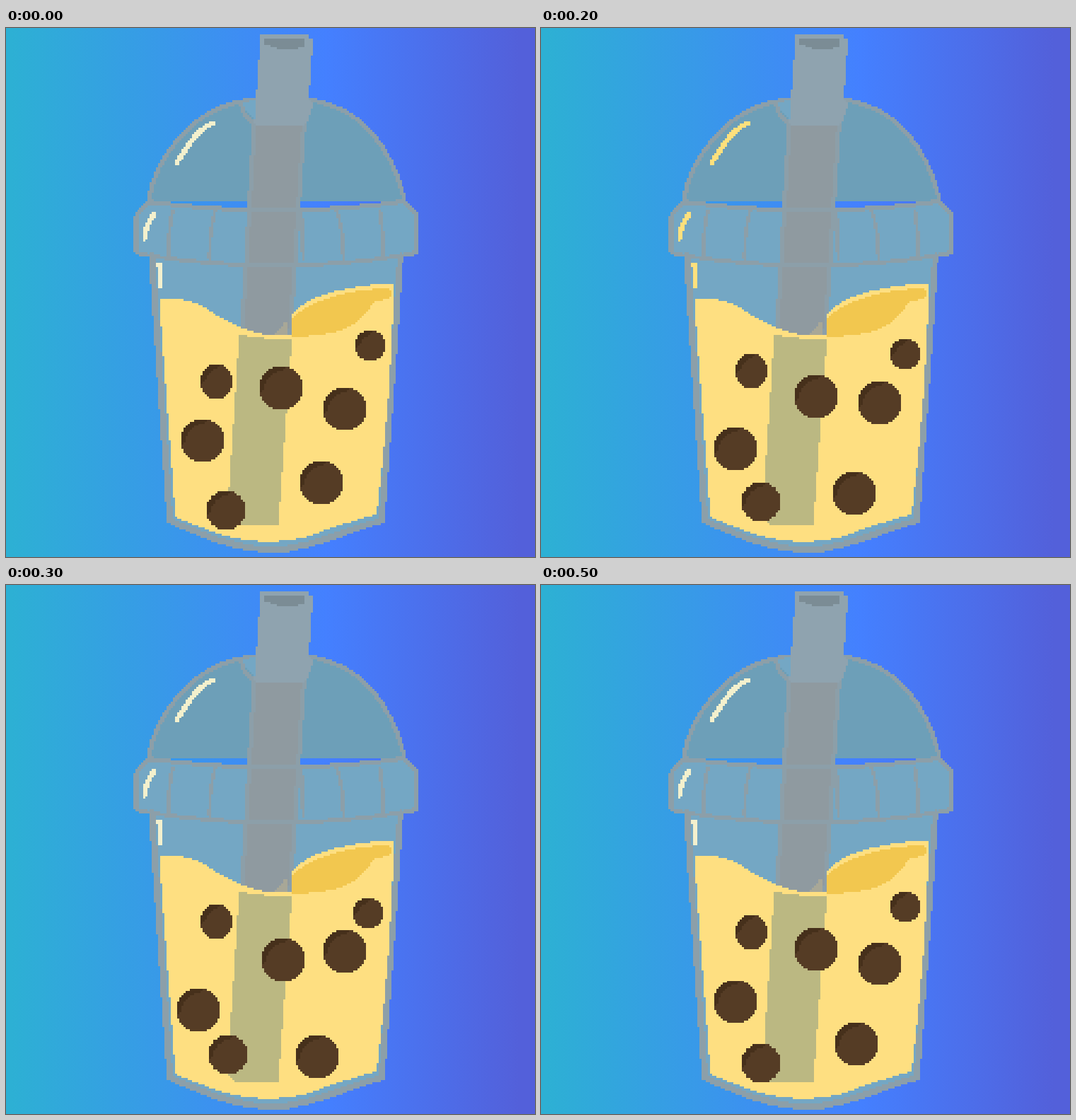
An HTML page with a canvas for the animation above (600 ms loop, 748 px wide and 748 px high).

```html
<!DOCTYPE html>
<html lang="en">
<head>
<meta charset="utf-8">
<title>Bubble tea</title>
<style>
  html, body { margin: 0; width: 100%; height: 100%; overflow: hidden; }
  body { background: linear-gradient(90deg, #2db0d4 1%, #4480ff 60.5%, #5360da 97%); }
  canvas { position: absolute; left: 0; top: 0; width: 100%; height: 100%; image-rendering: pixelated; }
</style>
</head>
<body>
<canvas id="cup"></canvas>
<canvas id="moving"></canvas>
<script>
const CELLS = 250, STAGE = 748;
const EDGE = '#8c9fa9', GLASS = '#74a7c4', TEA = '#fedf81';

function context(canvas) {
  canvas.width = canvas.height = CELLS;
  return canvas.getContext('2d', { willReadFrequently: true });
}
const cup = context(document.getElementById('cup'));
const moving = context(document.getElementById('moving'));
const pen = context(document.createElement('canvas'));
pen.lineJoin = pen.lineCap = 'round';

// Draws a path in stage units as hard-edged cells; without a width it is filled.
function paint(ctx, color, path, width) {
  const shape = new Path2D(path);
  pen.resetTransform();
  pen.clearRect(0, 0, CELLS, CELLS);
  pen.scale(CELLS / STAGE, CELLS / STAGE);
  pen.lineWidth = width || 1;
  if (width) pen.stroke(shape); else pen.fill(shape);
  const img = pen.getImageData(0, 0, CELLS, CELLS), d = img.data;
  const n = parseInt(color.slice(1), 16);
  for (let i = 0; i < d.length; i += 4) {
    d[i] = n >> 16;
    d[i + 1] = n >> 8 & 255;
    d[i + 2] = n & 255;
    d[i + 3] = d[i + 3] > 127 ? 255 : 0;
  }
  pen.putImageData(img, 0, 0);
  ctx.drawImage(pen.canvas, 0, 0);
}

function drawCup() {
  const fill = (color, path) => paint(cup, color, path);
  const line = (path, width = 6, color = EDGE) => paint(cup, color, path, width);

  const dome = 'M202 246C210 190 260 106 355 101H430C520 115 550 190 564 246';
  const rim = 'M203 246L184 264V318L203 322Q380 350 560 322L580 318V264L564 245Q380 271 203 246Z';
  const glass = 'M206.5 322L232 697C290 722 330 738 378 738C430 738 470 712 531 697L557.5 322';
  const surface = 'M217 384H243C290 384 310 437 404 437';
  const crest = 'M406 406C430 382 485 365 545 365';

  fill('#6d9fb8', dome);
  fill(GLASS, rim);
  fill(GLASS, glass);
  line(glass, 8.5);

  // straw seen through the lid
  fill('#8f9aa0', 'M351 137H421L402 436 334 430Z');
  line('M351 137L334 428M421 137L402 432');

  line(dome, 6.5);
  line(rim);
  for (const [top, bottom] of [[236, 230], [296, 288], [417, 420], [467, 477], [528, 533]])
    line(`M${top} 258Q${bottom} 285 ${bottom} 326`, 5);

  // lid opening and straw top
  fill(GLASS, 'M332 106L354 101V134Z');
  line('M333 107Q335 127 354 135');
  fill('#8fa3af', 'M360 9H428V16H434L428 101 434 105Q432 125 422 137H351L354 95Z');
  fill('#7b8c95', 'M364 14H422V25Q402 38 364 22Z');

  // tea
  fill(TEA, surface + 'L406 406C430 382 485 365 548 365Q545 510 524 688C460 702 430 726 375 726C320 726 290 712 240 692Z');
  fill('#f2c74f', 'M404 437V410C430 386 480 368 540 368Q556 381 522 387C505 403 500 436 404 437Z');
  line(crest, 6, TEA);
  fill('#a8a797', 'M397 413V433H380Z');
  fill('#bbb882', 'M330 432L404 441 385 703H323L313 690Z');
  line('M328 429Q352 437 404 438', 5, TEA);
}

// Pearls in cells: centre, radii, sideways drift, drop (negative rises), ease power
const pearls = [
  [172, 150, 7, 7, -.55, 5.45, .75],
  [99.5, 167, 7.5, 8, 0, -8.2, 1],
  [130, 170, 10, 10, .55, 7, 1],
  [160, 180, 10, 10, 0, -7, 1.7],
  [93, 195, 10, 10, -1.7, 6, 1],
  [149, 215, 10, 10, -1.55, 7.7, 1],
  [104, 228, 9, 9, .55, -6, 1]
];

// Share of the whole way at each step; sinking pearls come back more slowly.
const travel = (step, drop) => [0, .32, .6, 1, drop > 0 ? .78 : .48, .32][step];

function drawPearl(x, y, rx, ry) {
  const inside = (u, v) => Math.hypot(u / (rx + .2), v / (ry + .2)) < 1;
  for (let v = .5 - ry; v < ry; v++) {
    for (let u = .5 - rx; u < rx; u++) {
      if (!inside(u, v)) continue;
      moving.fillStyle = inside(u - 2, v - 2) || u + v > -rx * .75 ? '#553c25' : '#46301b';
      moving.fillRect(x + u - .5, y + v - .5, 1, 1);
    }
  }
}

function drawStep(step) {
  const shine = step === 2 ? '#fee07d' : '#f3f0cd';
  moving.clearRect(0, 0, CELLS, CELLS);
  paint(moving, shine, 'M293 134Q270 140 242 191M210 263Q196 280 197 298', 7);
  paint(moving, shine, 'M212 332H221V368H216V338H212Z');
  for (const [x, y, rx, ry, drift, drop, power] of pearls) {
    const way = travel(step, drop);
    drawPearl(x + Math.round(drift * way), y + Math.round(drop * way ** power), rx, ry);
  }
}

let shown = 0;
function tick(now) {
  const step = Math.floor(now % 600 / 100);
  if (step !== shown) drawStep(shown = step);
  requestAnimationFrame(tick);
}

drawCup();
drawStep(0);
requestAnimationFrame(tick);
</script>
</body>
</html>
```
